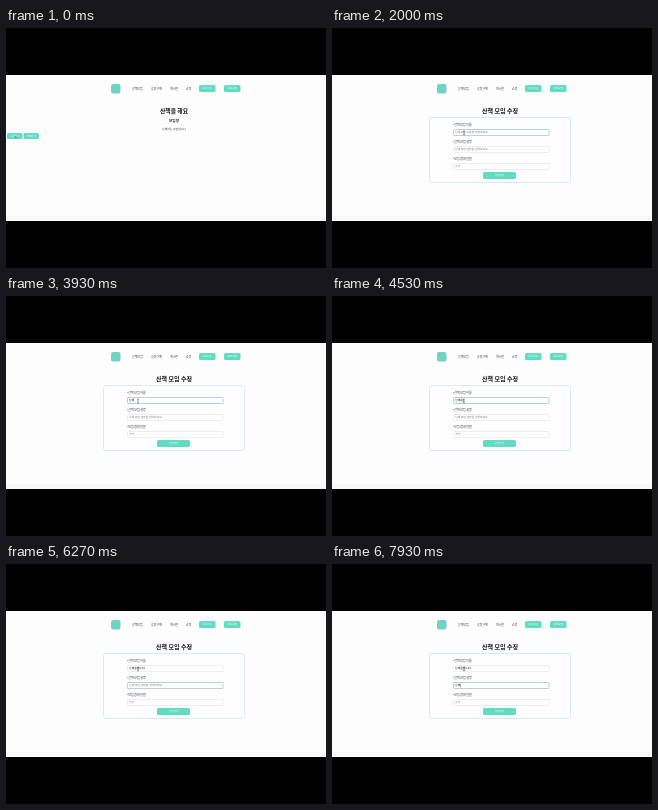
Write an HTML page with a canvas that moves like this. It is 320 by 240 pixels and loops after 8 s.

```html
<!DOCTYPE html>
<html lang="ko">
<head>
<meta charset="utf-8">
<style>
html, body { margin: 0; width: 100%; height: 100%; overflow: hidden; background: #000; }
canvas { display: block; width: 320px; height: 240px; }
</style>
</head>
<body>
<canvas id="stage"></canvas>
<script>
const LOOP = 8000;
const FORM_AT = 470;
const FOCUS_NAME = 1870;
const FOCUS_INFO = 6130;
const TEAL = '#62dcc0';
const FONT = '"Noto Sans CJK KR", "Noto Sans CJK", "Noto Sans", sans-serif';

const canvas = document.getElementById('stage');
const ratio = window.devicePixelRatio || 1;
canvas.width = 320 * ratio;
canvas.height = 240 * ratio;
const ctx = canvas.getContext('2d');

// Syllables appear piece by piece, as with a Korean keyboard.
const nameKeys = [
  [2800, 'ㅅ'], [2930, '사'], [3130, '산'], [3330, '산ㅊ'], [3470, '산채'], [3670, '산책'],
  [4130, '산책ㅇ'], [4270, '산책으'], [4400, '산책을'], [4670, '산책을 '],
  [4870, '산책을 ㅎ'], [5000, '산책을 하'], [5130, '산책을 할'], [5330, '산책을 합'],
  [5470, '산책을 합ㄴ'], [5600, '산책을 합니'], [5800, '산책을 합니다']
];
const infoKeys = [
  [6670, 'ㅅ'], [6800, '사'], [6930, '산'], [7130, '산ㅊ'], [7330, '산채'], [7530, '산책']
];

const pointerPath = [
  [0, 10, 109], [600, 10, 109], [1130, 65, 115], [1730, 132, 105], [LOOP, 132, 105]
];

function typed(keys, t) {
  let value = '';
  for (const [at, text] of keys) if (t >= at) value = text;
  return value;
}

function pointerAt(t) {
  let i = 1;
  while (i < pointerPath.length - 1 && t > pointerPath[i][0]) i++;
  const [t0, x0, y0] = pointerPath[i - 1];
  const [t1, x1, y1] = pointerPath[i];
  const k = Math.min(1, (t - t0) / (t1 - t0));
  const e = k * k * (3 - 2 * k);
  return [x0 + (x1 - x0) * e, y0 + (y1 - y0) * e];
}

function label(text, x, y, size, color, align = 'left', weight = 400) {
  ctx.font = `${weight} ${size}px ${FONT}`;
  ctx.fillStyle = color;
  ctx.textAlign = align;
  ctx.textBaseline = 'alphabetic';
  ctx.fillText(text, x, y + size * 0.36);
}

function box(x, y, w, h, r, fill, stroke, line = 0.5) {
  ctx.beginPath();
  ctx.roundRect(x, y, w, h, r);
  if (fill) {
    ctx.fillStyle = fill;
    ctx.fill();
  }
  if (stroke) {
    ctx.strokeStyle = stroke;
    ctx.lineWidth = line;
    ctx.stroke();
  }
}

function button(text, x, y, w, h) {
  box(x, y, w, h, 1.5, TEAL);
  label(text, x + w / 2, y + h / 2, 2.6, '#fff', 'center');
}

function field(title, hint, y, value, focused) {
  label('*' + title, 121, y - 4, 2.9, '#222', 'left', 500);
  box(121.5, y + 0.5, 95.5, 6, 0.8, '#fff', focused ? '#a5c3d6' : '#e2e4e6', focused ? 0.8 : 0.6);
  label(value || hint, 123, y + 3.4, 2.8, value ? '#111' : '#777');
  return 123 + (value ? ctx.measureText(value).width : 0);
}

function caret(x, y) {
  ctx.fillStyle = '#333';
  ctx.fillRect(x + 0.2, y + 1.8, 0.4, 3.4);
}

function header() {
  box(105, 56, 9.5, 9.5, 2, '#70d3c5');
  [['산책모임', 126], ['공동구매', 145], ['게시판', 164], ['쇼핑', 180]]
    .forEach(([text, x]) => label(text, x, 60.5, 2.9, '#333'));
  button('로그아웃', 193, 57, 16.5, 7);
  button('내프로필', 218, 57, 16.5, 7);
}

function detailPage() {
  label('산책을 해요', 168, 82.5, 5.8, '#111', 'center', 700);
  label('모임장', 168, 92.5, 3.6, '#222', 'center', 700);
  label('산책하는 모임입니다', 168, 101, 2.8, '#444', 'center');
  button('수정하기', 1, 105, 15.5, 6);
  button('삭제하기', 17.5, 105, 15.5, 6);
}

function formPage(t) {
  const onName = t >= FOCUS_NAME && t < FOCUS_INFO;
  const onInfo = t >= FOCUS_INFO;
  label('산책 모임 수정', 168, 82.5, 6, '#111', 'center', 700);
  box(97.5, 89.5, 141, 65, 2.5, '#fefefe', '#cfe9ef', 0.8);
  const nameEnd = field('산책 모임 이름', '산책 모임 이름을 입력하세요', 101, typed(nameKeys, t), onName);
  const infoEnd = field('산책 모임 설명', '산책 모임 설명을 입력하세요', 118, typed(infoKeys, t), onInfo);
  field('모임 참여 인원', '숫자', 135, '', false);
  button('수정하기', 151, 144, 33, 7);
  const blinkOn = t % 1060 < 530;
  if (onName && blinkOn) caret(nameEnd, 101);
  if (onInfo && blinkOn) caret(infoEnd, 118);
}

function pointer(t) {
  const [x, y] = pointerAt(t);
  ctx.lineWidth = 0.6;
  ctx.strokeStyle = '#555';
  if (t >= 1650) {
    ctx.beginPath();
    ctx.moveTo(x - 0.8, y - 1.8);
    ctx.lineTo(x + 0.8, y - 1.8);
    ctx.moveTo(x, y - 1.8);
    ctx.lineTo(x, y + 1.8);
    ctx.moveTo(x - 0.8, y + 1.8);
    ctx.lineTo(x + 0.8, y + 1.8);
    ctx.stroke();
    return;
  }
  ctx.beginPath();
  ctx.moveTo(x - 0.8, y - 1.3);
  ctx.lineTo(x - 0.8, y + 1.3);
  ctx.lineTo(x + 1, y + 0.5);
  ctx.closePath();
  ctx.fillStyle = '#777';
  ctx.fill();
}

function draw(t) {
  ctx.setTransform(ratio, 0, 0, ratio, 0, 0);
  ctx.fillStyle = '#000';
  ctx.fillRect(0, 0, 320, 240);
  ctx.fillStyle = '#fdfdfd';
  ctx.fillRect(0, 47, 320, 146);
  ctx.fillStyle = '#f8f8f8';
  ctx.fillRect(0, 188, 320, 5);
  header();
  if (t < FORM_AT) detailPage();
  else formPage(t);
  pointer(t);
}

const start = performance.now();
function tick() {
  draw((performance.now() - start) % LOOP);
  requestAnimationFrame(tick);
}
tick();
</script>
</body>
</html>
```
